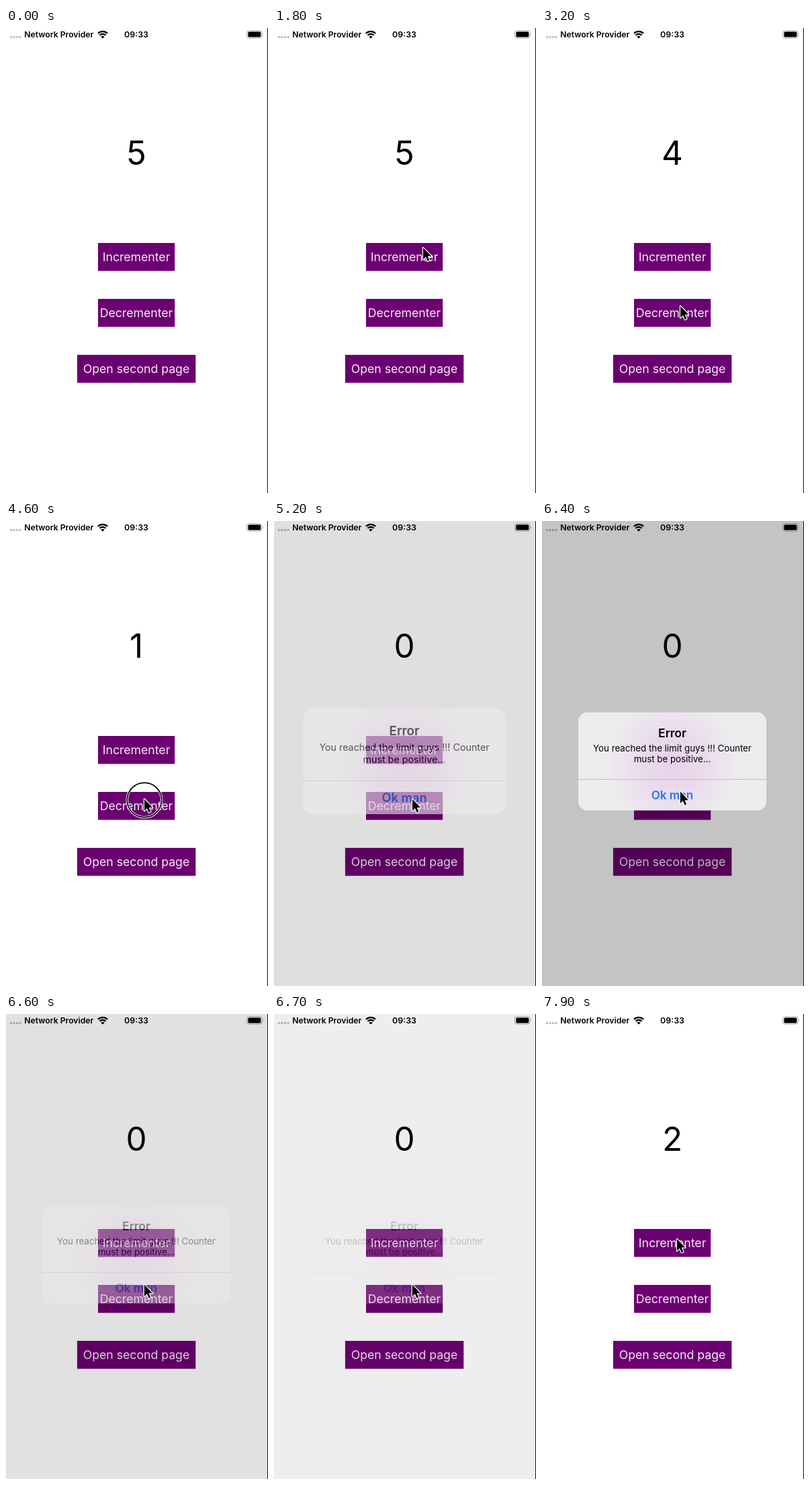
Recreate the animation shown at these times as an HTML page. Size 390 px wide and 690 px high, loop 8000 ms.

```html
<!DOCTYPE html>
<html lang="en">
<head>
<meta charset="utf-8">
<title>Counter app</title>
<style>
  html, body { margin: 0; height: 100%; overflow: hidden; background: #fff; }
  svg { display: block; width: 100vw; height: 100vh; font-family: Inter, "Open Sans", sans-serif; }
  text { text-anchor: middle; }
  .status { font-size: 12.2px; font-weight: 600; }
  .count { font-size: 49.3px; }
  .button rect { fill: #6b0070; }
  .button text { fill: #f7eaf7; font-size: 17.65px; }
  .title { font-size: 17.5px; font-weight: 600; }
  .message { font-size: 13.3px; }
  .action { font-size: 17px; font-weight: 600; fill: #1f7af4; }
  .cursor { stroke: #fff; stroke-width: 2.4; stroke-linejoin: round; paint-order: stroke; }
  .ring { fill: none; }
</style>
</head>
<body>
<svg viewBox="0 0 390 690" preserveAspectRatio="none">
  <defs>
    <radialGradient id="tint" gradientUnits="userSpaceOnUse" cx="194" cy="360" r="100">
      <stop offset="0" stop-color="#e8d1ea"/>
      <stop offset=".5" stop-color="#eadcec"/>
      <stop offset="1" stop-color="#ededee"/>
    </radialGradient>
  </defs>
  <rect width="390" height="690" fill="#fff"/>

  <text class="count" id="count" x="194" y="203">5</text>
  <g class="button">
    <rect x="137" y="319" width="114.2" height="41.5"/>
    <text x="194" y="346.2">Incrementer</text>
    <rect x="137" y="402" width="114.2" height="41.5"/>
    <text x="194" y="429.4">Decrementer</text>
    <rect x="105.9" y="485" width="176.4" height="41.5"/>
    <text x="194" y="512.4">Open second page</text>
  </g>

  <g fill="#bcbcbc">
    <circle cx="7.5" cy="13.5" r="1.7"/><circle cx="12" cy="13.5" r="1.7"/>
    <circle cx="16.5" cy="13.5" r="1.7"/><circle cx="21" cy="13.5" r="1.7"/>
  </g>
  <rect x="358.5" y="4" width="22.5" height="11" rx="3" fill="none" stroke="#a6a6a6"/>
  <path d="M382.5 7.7q1.6 1.8 0 3.6z" fill="#a6a6a6"/>

  <rect id="dim" width="389" height="690" opacity="0"/>

  <text class="status" x="78.8" y="14">Network Provider</text>
  <text class="status" x="194" y="14" style="font-size:12.4px">09:33</text>
  <g fill="none" stroke="#000" stroke-width="2.2">
    <path d="M136.9 8a10 10 0 0 1 14.2 0M139.4 10.8a6.5 6.5 0 0 1 9.2 0"/>
    <path d="M144 15.6l-2.6-2.6a3.7 3.7 0 0 1 5.2 0z" fill="#000" stroke="none"/>
  </g>
  <rect x="360.3" y="5.6" width="19" height="7.9" rx="1.6"/>

  <g id="alert" opacity="0">
    <rect x="54" y="284" width="280" height="145.5" rx="13.5" fill="url(#tint)"/>
    <path d="M54 383.5H334" stroke="#bfbcc1"/>
    <text class="title" x="194" y="321">Error</text>
    <text class="message" x="194" y="342">You reached the limit guys !!! Counter</text>
    <text class="message" x="194" y="358.5">must be positive...</text>
    <text class="action" x="194" y="413">Ok man</text>
  </g>

  <g id="pointer" visibility="hidden">
    <g id="ring" class="ring" transform="translate(0 1.3)">
      <circle r="25.7" stroke="#fff" stroke-width="3.6"/>
      <circle r="25.7" stroke="#000" stroke-width="1.7"/>
    </g>
    <path class="cursor" d="M0 0V17.4L4 13.6L6.7 20L9.4 18.8L6.7 12.6H12.2Z"/>
  </g>
  <rect x="389" width="1" height="690" fill="#111"/>
</svg>
<script>
  const LOOP = 8000, TICK = 100;
  const [count, dim, alertBox, pointer, ring] =
    ['count', 'dim', 'alert', 'pointer', 'ring'].map(id => document.getElementById(id));

  // time, x, y of the pointer tip
  const path = [
    [1100, 337, 358], [1400, 256, 328], [1500, 256, 328], [1800, 222, 326],
    [2400, 205, 408], [2500, 206, 412.7], [5800, 206, 412.7], [6100, 205.8, 401.6],
    [7100, 205.8, 401.6], [7400, 201, 334], [LOOP, 201, 334]
  ];
  const presses = [2900, 3400, 4200, 4600, 4900, 6300, 7500, 7800];
  // time, value shown from then on
  const values = [[0, 5], [3000, 4], [3500, 3], [4000, 2], [4300, 1], [4700, 0], [7600, 1], [7900, 2]];

  // share of the way still to go in a critically damped spring
  const remaining = (ms, rate) => {
    const x = Math.max(0, ms) * rate;
    return (1 + x) * Math.exp(-x);
  };

  function pointerAt(t) {
    const i = Math.max(1, path.findIndex(p => p[0] >= t));
    const [t0, x0, y0] = path[i - 1], [t1, x1, y1] = path[i];
    const u = (t - t0) / (t1 - t0), e = u * u * (3 - 2 * u);
    return [x0 + (x1 - x0) * e, y0 + (y1 - y0) * e];
  }

  function draw(t) {
    count.textContent = values.filter(v => v[0] <= t).pop()[1];

    const left = remaining(t - 5000, .0092);
    const stay = t < 7200 ? remaining(t - 6400, .0082) : 0;
    const scale = 1 + .166 * left;
    dim.setAttribute('opacity', .23 * (1 - left) * stay);
    alertBox.setAttribute('opacity', (1 - Math.pow(left, 1.2)) * Math.pow(stay, 1.35));
    alertBox.setAttribute('transform',
      `translate(194 356.7) scale(${scale}) translate(-194 -356.7)`);

    const shown = t >= path[0][0];
    pointer.setAttribute('visibility', shown ? 'visible' : 'hidden');
    if (shown) pointer.setAttribute('transform', `translate(${pointerAt(t)})`);
    ring.setAttribute('display', presses.some(p => t >= p && t < p + TICK) ? 'inline' : 'none');
  }

  const start = performance.now();
  function frame() {
    const t = (performance.now() - start) % LOOP;
    draw(Math.floor(t / TICK) * TICK);
    requestAnimationFrame(frame);
  }
  frame();
</script>
</body>
</html>
```
